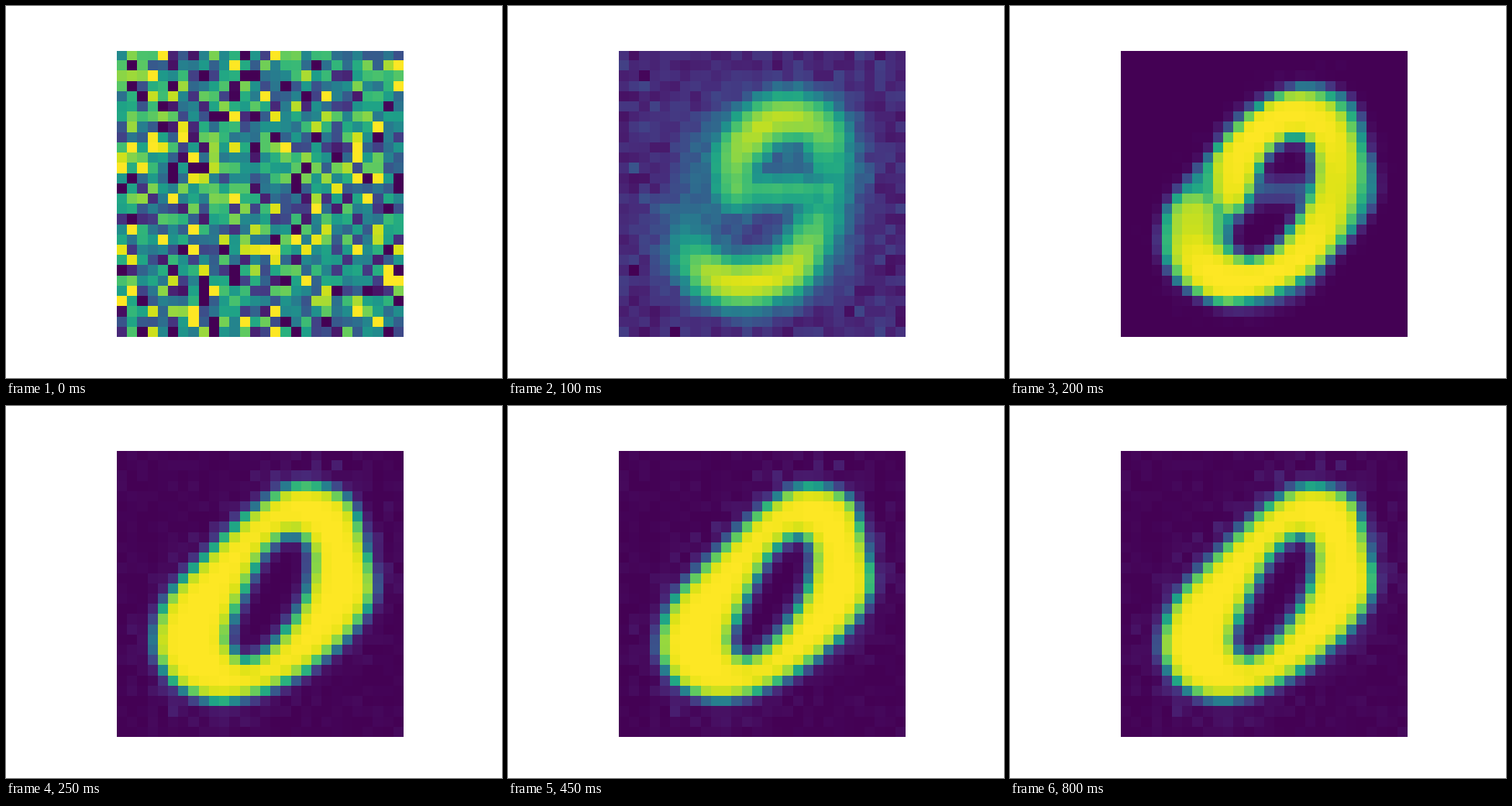
Write a matplotlib script that moves like this. It is 640 by 480 pixels and loops after 1350 ms.

```python
import numpy as np
import matplotlib.pyplot as plt
from matplotlib.animation import FuncAnimation
from matplotlib.path import Path

N = 28
STEP_MS = 50
FRAMES = 27
ROWS, COLS = np.mgrid[:N, :N]
CELLS = np.column_stack([COLS.ravel(), ROWS.ravel()])


def sigmoid(v):
    return 1 / (1 + np.exp(-np.clip(v, -40, 40)))


def bump(x, y, cx, cy, size):
    return np.exp(-((x - cx) ** 2 + (y - cy) ** 2) / (2 * size ** 2))


def curve(points, closed=False, per_segment=16):
    """Catmull-Rom curve through a few key points."""
    p = np.asarray(points, float)
    if closed:
        p = np.vstack([p[-1:], p, p[:2]])
    else:
        p = np.vstack([2 * p[:1] - p[1:2], p, 2 * p[-1:] - p[-2:-1]])
    t = np.linspace(0, 1, per_segment)[:, None]
    pieces = [
        b + t * (c - a) / 2 + t ** 2 * (a - 2.5 * b + 2 * c - d / 2)
        + t ** 3 * (1.5 * (b - c) + (d - a) / 2)
        for a, b, c, d in zip(p, p[1:], p[2:], p[3:])]
    return np.vstack(pieces)


def distances(line):
    return np.hypot(*(CELLS[:, None] - line[None]).transpose(2, 0, 1))


def stroke(line, radius, softness, strength=1.0):
    """Soft pen line; strength may vary along it."""
    ink = sigmoid((radius - distances(line)) / softness) * strength
    return ink.max(axis=1).reshape(N, N) / sigmoid(radius / softness)


def filled(outline, softness=0.36):
    depth = distances(outline).min(axis=1)
    inside = Path(outline).contains_points(CELLS)
    return sigmoid(np.where(inside, depth, -depth) / softness).reshape(N, N)


def widen(outline, amount):
    """Stretch an outline across its slanted long axis."""
    normal = np.array([0.75, 0.66])
    offset = (outline - outline.mean(axis=0)) @ normal
    return outline + amount * offset[:, None] * normal


rng = np.random.default_rng(12)
STATIC = np.clip(rng.normal(0.48, 0.32, (N, N)), 0, 1)
GRAIN = rng.normal(0, 1, (N, N))
SPECKS = np.abs(rng.normal(0, 1, (N, N)))

OUTER = curve([(17.5, 2.95), (22, 4.2), (23.7, 9), (24.1, 13.5), (21, 18),
               (16, 21.7), (10, 23.9), (5.5, 22.6), (3.4, 19), (4.7, 14.3),
               (9.2, 9.3), (13.5, 5.2)], closed=True)
INNER = curve([(16.8, 8), (18.4, 9.5), (17.6, 13.5), (15, 17.5), (12, 19.7),
               (10.5, 18), (11.7, 14.6), (14.2, 10)], closed=True)
SPINE = curve([(11, 13), (11.2, 9.5), (14.5, 6.4), (18.8, 6.8), (20.4, 11),
               (19.2, 16), (16, 21), (10.5, 22.2), (7, 19.8), (6.5, 16)])
CROSSBAR = curve([(11, 13.1), (20, 13.3)])


def body_shape():
    reach = (np.abs(COLS - 14.1) / 8.8) ** 3 + (np.abs(ROWS - 14.2) / 10.3) ** 3
    return sigmoid((1 - np.cbrt(reach)) / 0.07)


def average_blur():
    arc = curve([(8, 13), (10, 8.7), (15, 6)])
    streak = curve([(15.4, 6), (14.2, 16)])
    base = curve([(7.5, 21.3), (14.5, 22), (20, 17)])
    streak_ink = 0.5 + 0.5 * bump(*streak.T, 15.4, 8.3, 2)
    base_ink = 0.38 + 0.64 * bump(*base.T, 14.8, 22, 2.5)
    image = np.maximum.reduce([
        0.29 * body_shape(),
        stroke(arc, 1.3, 0.45, 0.53),
        stroke(streak, 1.1, 0.45, streak_ink),
        stroke(base, 1.15, 0.45, base_ink)])
    return image - 0.17 * bump(COLS, ROWS, 10.6, 16.8, 1.6)


def open_figure(fade, softness, bar_radius):
    """Open double loop, faded on its right side and at both ends."""
    x, y = SPINE.T
    loss = (bump(x, y, 21, 13, 4.5) + 0.35 * bump(x, y, 10.5, 12, 3)
            + 1.4 * bump(x, y, 6, 16.5, 2.8))
    return np.maximum(stroke(SPINE, 2.4, softness, 1 - fade * loss),
                      stroke(CROSSBAR, bar_radius, softness, 0.68))


def faint_figure():
    hollow = 1 - 0.9 * bump(COLS, ROWS, 12.9, 17, 1.7)
    haze = np.maximum(0.25 * body_shape(), stroke(SPINE, 4, 0.6, 0.2)) * hollow
    image = np.maximum(open_figure(0.48, 0.72, 1.6), haze)
    return 0.11 + 0.87 * image + 0.04 * GRAIN * (1 - image)


def strong_figure():
    haze = stroke(SPINE, 4, 0.6, 0.1)
    image = np.maximum(open_figure(0.25, 0.52, 1.25), haze)
    return image + 0.012 * SPECKS * (1 - image)


def ring(progress):
    slack = 1 - progress
    hole = filled(widen(INNER, 0.16 * slack))
    body = filled(widen(OUTER, 0.07 * slack)) * (1 - hole)
    halo = stroke(OUTER, 2.6, 0.4)
    dust = SPECKS * (0.012 + 0.03 * halo) * (1 - hole)
    return np.maximum(body, dust)


def between_figures():
    mix = np.clip((strong_figure() + ring(0)) / 2, 0, 1)
    return mix ** 2 * (3 - 2 * mix)


OPENING = [STATIC, average_blur(), faint_figure(), strong_figure(),
           between_figures()]


def picture(frame):
    if frame < len(OPENING):
        return OPENING[frame]
    return ring(1 - 0.4 ** (frame - len(OPENING)))


fig, ax = plt.subplots(figsize=(6.4, 4.8), dpi=100)
ax.axis("off")
artist = ax.imshow(picture(0), cmap="viridis", vmin=0, vmax=1,
                   interpolation="nearest")


def update(frame):
    artist.set_data(picture(frame))
    return [artist]


animation = FuncAnimation(fig, update, frames=FRAMES, interval=STEP_MS,
                          repeat=True, repeat_delay=0)
plt.show()
```
